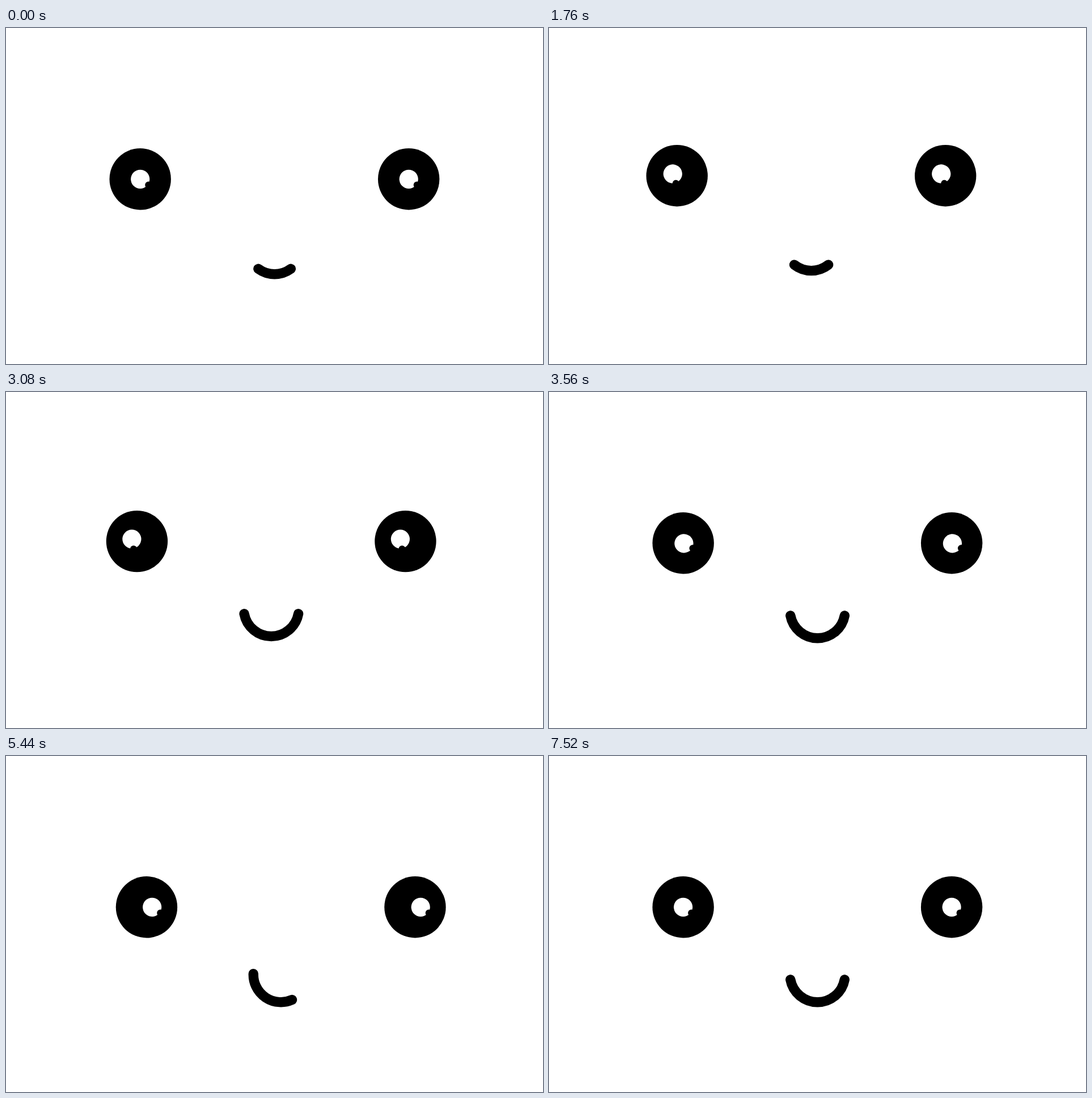
These frames come from a looping animation (947x592 px, 8000 ms). An HTML page:

```html
<!DOCTYPE html>
<html lang="en">
<head>
<meta charset="utf-8">
<title>Little face</title>
<style>
  html, body { margin: 0; width: 100%; height: 100%; overflow: hidden; background: #fff; }
  svg { display: block; width: 100%; height: 100%; }
</style>
</head>
<body>
<svg viewBox="0 0 947 592">
  <defs>
    <g id="pupil">
      <circle r="16.6" fill="#fff"/>
      <circle cx="14.5" cy="10.1" r="6"/>
    </g>
  </defs>
  <g id="face">
    <g class="eye"><circle r="54.2"/><use href="#pupil"/></g>
    <g class="eye"><circle r="54.2"/><use href="#pupil"/></g>
    <path id="mouth" fill="none" stroke="#000" stroke-width="17.4" stroke-linecap="round"/>
  </g>
</svg>
<script>
const LOOP = 8000, STEP = 40;
const EYE_X = [236.7, 710.2], EYE_Y = 266.3;
const MOUTH = { x: 473.6, y: 385.1, r: 48.6 };

const face = document.getElementById('face');
const mouth = document.getElementById('mouth');
const eyes = [...document.querySelectorAll('.eye')];
const pupils = eyes.map(e => e.querySelector('use'));

const clamp = v => Math.min(1, Math.max(0, v));
const part = (t, start, len) => clamp((t - start) / len);
const smooth = p => p < 0.5 ? 2 * p * p : 1 - 2 * (1 - p) * (1 - p);
const backOut = p => 1 + 1.95 * (p - 1) ** 3 + 0.95 * (p - 1) ** 2;

// Step response of a damped spring; w in rad/s, z is the damping ratio.
function spring(t, start, w, z) {
  const s = (t - start) / 1000 * w;
  if (s <= 0) return 0;
  const d = Math.sqrt(1 - z * z);
  return 1 - Math.exp(-z * s) * (Math.cos(d * s) + z / d * Math.sin(d * s));
}

const headOut = (t, start) => spring(t, start, 9.2, 0.36);
const headBack = (t, start) => spring(t, start, 9.2, 0.44);
const gaze = (t, start) => spring(t, start, 8, 0.5);

function draw(t) {
  const shut = part(t, 610, 110) - backOut(part(t, 900, 380));
  const headLeft = headOut(t, 1570) - headBack(t, 2932);
  const headRight = headOut(t, 4225) - headBack(t, 6295);
  const gazeLeft = gaze(t, 1570) - gaze(t, 2977);
  const gazeRight = gaze(t, 4225) - gaze(t, 6298);
  const smile = smooth(part(t, 1640, 800));
  const smirk = smooth(part(t, 4320, 800)) - smooth(part(t, 6105, 840));

  const x = -13.3 * headLeft + 11.1 * headRight;
  const y = -7.4 * headLeft + 9.5 * shut;
  face.setAttribute('transform', `translate(${x} ${y})`);

  const look = `translate(${-12 * gazeLeft + 9.7 * gazeRight} ${-5.2 * gazeLeft}) rotate(${60 * gazeLeft})`;
  eyes.forEach((eye, i) => {
    eye.setAttribute('transform', `translate(${EYE_X[i]} ${EYE_Y}) scale(1 ${1 - 0.9 * shut})`);
    pupils[i].setAttribute('transform', look);
  });

  // Angles of the two mouth ends, measured from the bottom of its circle.
  const base = 36.3 + 43.2 * smile;
  const end = deg => {
    const a = deg * Math.PI / 180;
    return `${MOUTH.x + MOUTH.r * Math.sin(a)} ${MOUTH.y + MOUTH.r * Math.cos(a)}`;
  };
  mouth.setAttribute('d',
    `M${end(-base - 12.2 * smirk)}A${MOUTH.r} ${MOUTH.r} 0 0 0 ${end(base - 55.7 * smirk)}`);
}

const origin = performance.now();
function tick() {
  const t = (performance.now() - origin) % LOOP;
  draw(Math.floor(t / STEP) * STEP);
  requestAnimationFrame(tick);
}
tick();
</script>
</body>
</html>
```
